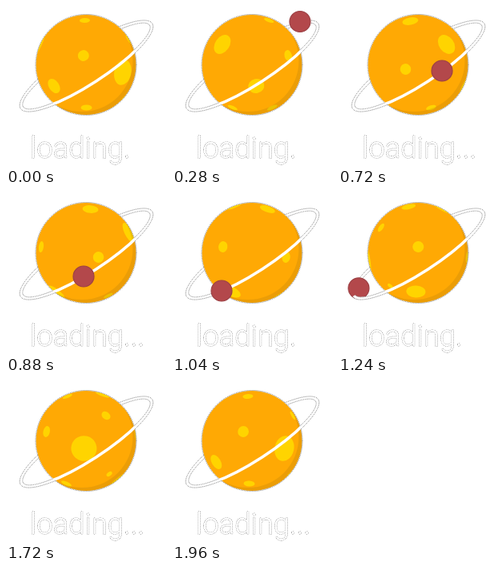
Animation, 200 px wide and 200 px high, one loop 2 s. Source, as an HTML page with a canvas:

```html
<!DOCTYPE html>
<html lang="en">
<head>
<meta charset="utf-8">
<title>Loading</title>
<style>
html, body { margin: 0; width: 100%; height: 100%; overflow: hidden; background: #fff; }
canvas { display: block; }
</style>
</head>
<body>
<canvas id="stage" width="200" height="200"></canvas>
<script>
const ctx = document.getElementById('stage').getContext('2d');
const LOOP = 2000, STEP = 40, TAU = Math.PI * 2;
const planet = { x: 100, y: 73.5, r: 62.5 };
const ring = { x: 100.5, y: 75, a: 96, b: 22.5, tilt: -0.574 };

// Surface spots: longitude at the start (degrees), height on stage, radius
const spots = [
  [-3, 62, 7], [-45, 100, 10], [48, 83, 16], [1, 127, 7], [-3, 18, 6.5],
  [-91, 48, 13], [-144, 79, 7], [-148, 19, 10], [-99, 127, 6.5],
  [137, 66, 7], [78, 42, 6], [108, 16, 9], [89, 115, 4], [133, 122, 12]
];

// Moon path: time, x, y
const path = [
  [0, 104, 50], [140, 135, 32], [280, 160, 19.5], [410, 176, 29],
  [560, 160, 56], [720, 130, 81], [880, 97, 103], [1040, 62, 121],
  [1120, 43, 128], [1220, 26, 121], [1340, 36, 97], [1480, 64, 73]
];

function circle(x, y, r) {
  ctx.beginPath();
  ctx.arc(x, y, r, 0, TAU);
}

function dotted(draw) {
  ctx.save();
  ctx.setLineDash([1, 1]);
  ctx.lineWidth = 1;
  ctx.strokeStyle = '#777';
  draw();
  ctx.restore();
}

function slope(i, axis) {
  const p = path[Math.max(0, i - 1)], q = path[Math.min(path.length - 1, i + 1)];
  return (q[axis] - p[axis]) / (q[0] - p[0]);
}

function along(i, t, axis) {
  const p = path[i], q = path[i + 1], span = q[0] - p[0];
  const u = (t - p[0]) / span, v = 1 - u;
  return p[axis] * (1 + 2 * u) * v * v + q[axis] * u * u * (3 - 2 * u) +
    span * (slope(i, axis) * u * v * v - slope(i + 1, axis) * u * u * v);
}

function drawSpot([lon, y, r], t) {
  const angle = (lon + 360 * t / LOOP) * Math.PI / 180;
  if (Math.cos(angle) < -0.05) return;
  const dy = y - planet.y;
  const dx = Math.sqrt(planet.r ** 2 - dy * dy) * Math.sin(angle);
  const flat = Math.sqrt(Math.max(0.02, 1 - (dx * dx + dy * dy) / planet.r ** 2));
  ctx.beginPath();
  ctx.ellipse(planet.x + dx, y, r * flat, r, Math.atan2(dy, dx), 0, TAU);
  ctx.fill();
}

function drawPlanet(t) {
  const { x, y, r } = planet;
  ctx.save();
  circle(x, y, r);
  ctx.fillStyle = '#ffa904';
  ctx.fill();
  ctx.clip();
  ctx.fillStyle = '#ffd400';
  spots.forEach(s => drawSpot(s, t));
  // Shade along the lower right edge
  ctx.beginPath();
  ctx.rect(0, 0, 200, 200);
  ctx.arc(x - 5, y - 5, r + 1, 0, TAU);
  ctx.fillStyle = 'rgba(145,100,20,0.18)';
  ctx.fill('evenodd');
  ctx.restore();
  dotted(() => { circle(x, y, r + 0.5); ctx.stroke(); });
}

function drawRing(from, to) {
  const trace = grow => {
    ctx.beginPath();
    ctx.ellipse(ring.x, ring.y, ring.a + grow, ring.b + grow, ring.tilt, from, to);
    ctx.stroke();
  };
  ctx.strokeStyle = '#fff';
  ctx.lineWidth = 3.6;
  trace(0);
  dotted(() => {
    // Edges only show where the ring leaves the planet
    ctx.beginPath();
    ctx.rect(0, 0, 200, 200);
    ctx.arc(planet.x, planet.y, planet.r, 0, TAU);
    ctx.clip('evenodd');
    trace(2);
    trace(-2);
  });
}

function drawMoon(t) {
  const i = path.findIndex((p, k) => k + 1 < path.length && t >= p[0] && t < path[k + 1][0]);
  if (i < 0) return;
  circle(along(i, t, 1), along(i, t, 2), 13);
  ctx.fillStyle = '#b3484b';
  ctx.fill();
  ctx.lineWidth = 1.2;
  ctx.strokeStyle = '#9c4145';
  ctx.stroke();
}

function drawText(t) {
  const label = 'loading' + '.'.repeat(1 + Math.floor(t * 6 / LOOP) % 3);
  ctx.font = '300 36.5px Roboto, "Open Sans", sans-serif';
  ctx.textBaseline = 'alphabetic';
  dotted(() => {
    ctx.lineJoin = 'round';
    ctx.strokeText(label, 30, 190);
  });
  ctx.fillStyle = '#fff';
  ctx.fillText(label, 30, 190);
}

function render(time) {
  const t = Math.floor(time % LOOP / STEP) * STEP;
  const behind = t < 400 || t >= 1220;
  ctx.fillStyle = '#fff';
  ctx.fillRect(0, 0, 200, 200);
  drawRing(Math.PI, TAU);
  if (behind) drawMoon(t);
  drawPlanet(t);
  drawRing(0, Math.PI);
  if (!behind) drawMoon(t);
  drawText(t);
}

const start = performance.now();
function tick() {
  render(performance.now() - start);
  requestAnimationFrame(tick);
}
tick();
</script>
</body>
</html>
```
